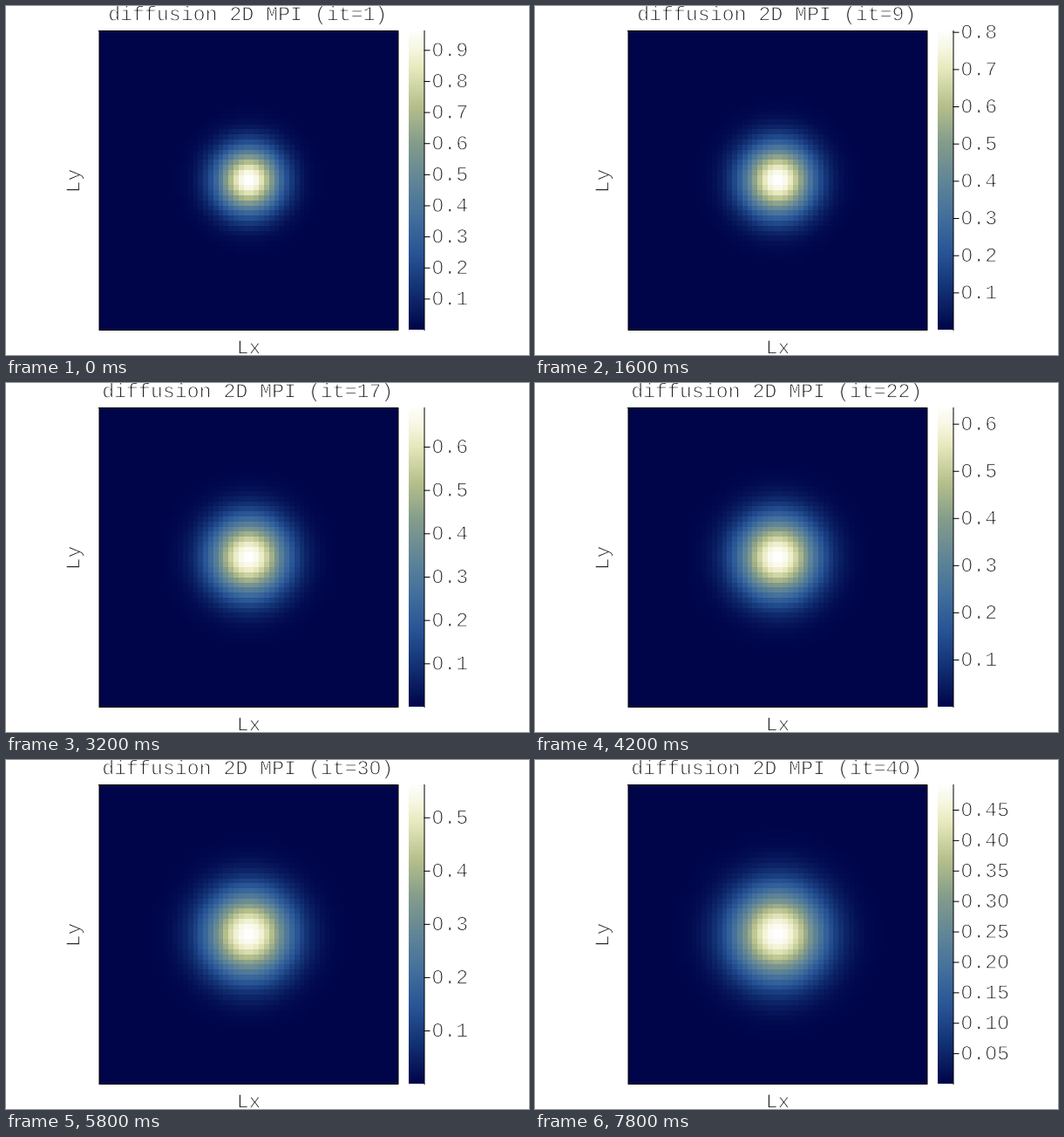
Write a matplotlib script that moves like this. It is 600 by 400 pixels and loops after 8000 ms.

```python
import numpy as np
import matplotlib.pyplot as plt
from matplotlib.animation import FuncAnimation
from matplotlib.colors import LinearSegmentedColormap
from matplotlib.patches import PathPatch, Rectangle
from matplotlib.path import Path
from matplotlib.textpath import TextPath

W, H, DPI = 600, 400, 100
PX = 72 / DPI                       # one pixel in points
LEFT, RIGHT, TOP, BOTTOM = 107, 450, 28.5, 371.5
BAR_L, BAR_R = 462, 480
STEPS, INTERVAL = 40, 200
SIZE = 23.2
ADV = 0.6 * SIZE                    # monospace advance
LINE = dict(color="black", lw=PX, snap=False)

# --- diffusion model ---
N, LENGTH, D = 62, 10.0, 1.0


def simulate():
    dx = LENGTH / N
    dt = dx**2 / D / 4.1
    x = (np.arange(N) + 0.5) * dx - LENGTH / 2
    c = np.exp(-x[:, None]**2 - x[None, :]**2)
    states = []
    for _ in range(STEPS):
        lap = (c[2:, 1:-1] + c[:-2, 1:-1] + c[1:-1, 2:] + c[1:-1, :-2]
               - 4 * c[1:-1, 1:-1])
        c[1:-1, 1:-1] += dt * D / dx**2 * lap
        states.append(c[1:-1, 1:-1].copy())
    return states


states = simulate()

cmap = LinearSegmentedColormap.from_list("deep", [
    (0.000, "#00054a"), (0.125, "#112f71"), (0.250, "#275395"),
    (0.375, "#426f9c"), (0.500, "#618697"), (0.625, "#849c8b"),
    (0.750, "#b6c08c"), (0.875, "#e8e9be"), (0.940, "#f7f7e2"),
    (1.000, "#fefefe")], N=256)

# --- thin monospace lettering ---
glyphs = {}


def glyph(ch):
    if ch not in glyphs:
        p = TextPath((0, 0), ch, size=SIZE, prop={"family": "Liberation Mono"})
        starts = np.flatnonzero(p.codes == Path.MOVETO)[1:]
        parts = list(zip(np.split(p.vertices, starts), np.split(p.codes, starts)))
        if ch == "0":               # plain zero without its inner dot
            parts.sort(key=lambda q: -np.ptp(q[0][:-1], axis=0).prod())
            parts = parts[:2]
        glyphs[ch] = (np.concatenate([q[0] for q in parts]),
                      np.concatenate([q[1] for q in parts]))
    return glyphs[ch]


def lettering(s, x, y, centre=False, upright=False):
    shift = -len(s) * ADV / 2 if centre else 0
    verts, codes = [], []
    for i, ch in enumerate(s):
        if ch == " ":
            continue
        v, c = glyph(ch)
        u = v[:, 0] + shift + i * ADV
        if upright:
            verts.append(np.column_stack([x - v[:, 1], y - u]))
        else:
            verts.append(np.column_stack([x + u, y - v[:, 1]]))
        codes.append(c)
    return Path(np.concatenate(verts), np.concatenate(codes))


# --- stage ---
fig = plt.figure(figsize=(W / DPI, H / DPI), dpi=DPI, facecolor="white")
ax = fig.add_axes([0, 0, 1, 1])
ax.axis("off")

cx, cy = (LEFT + RIGHT) / 2, (TOP + BOTTOM) / 2
n = states[0].shape[0]
half = (RIGHT - LEFT) / (n - 1) / 2   # outer cells are cut in half
heat = ax.imshow(states[0], cmap=cmap, aspect="auto", interpolation="nearest",
                 extent=(LEFT - half, RIGHT + half, BOTTOM + half, TOP - half))
ax.imshow(np.linspace(1, 0, 256)[:, None], cmap=cmap, aspect="auto",
          interpolation="nearest", extent=(BAR_L, BAR_R, BOTTOM, TOP))
ax.set_xlim(0, W)
ax.set_ylim(H, 0)
heat.set_clip_path(Rectangle((LEFT, TOP), RIGHT - LEFT, BOTTOM - TOP,
                             transform=ax.transData))

ax.plot([LEFT, RIGHT, RIGHT, LEFT, LEFT], [TOP, TOP, BOTTOM, BOTTOM, TOP], **LINE)
ax.plot([BAR_R, BAR_R], [TOP, BOTTOM], **LINE)
ticks, = ax.plot([], [], **LINE)


def add_text(path):
    # the white edge slims the strokes
    return ax.add_patch(PathPatch(path, fc="#222222", ec="white", lw=0.9 * PX,
                                  snap=False))


add_text(lettering("Lx", cx, 398.5, centre=True))
add_text(lettering("Ly", 84.5, cy + 0.5, centre=True, upright=True))
title = add_text(lettering("-", 0, 0))
labels = add_text(lettering("-", 0, 0))


def update(k):
    c = states[k]
    lo, hi = c.min(), c.max()
    heat.set_data(c)
    heat.set_clim(lo, hi)
    title.set_path(lettering(f"diffusion 2D MPI (it={k + 1})", cx - 1.2, 16.5,
                             centre=True))

    step, digits = (0.1, 1) if hi >= 0.5 else (0.05, 2)
    values = step * np.arange(1, int(hi / step) + 1)
    ys = BOTTOM - (values - lo) / (hi - lo) * (BOTTOM - TOP)
    labels.set_path(Path.make_compound_path(
        *[lettering(f"{v:.{digits}f}", 488.4, y + 6.8) for v, y in zip(values, ys)]))
    gap = np.full_like(ys, np.nan)
    ticks.set_data(np.tile([BAR_R, BAR_R + 6, np.nan], len(ys)),
                   np.column_stack([ys, ys, gap]).ravel())
    return heat, title, labels, ticks


anim = FuncAnimation(fig, update, frames=STEPS, interval=INTERVAL, repeat=True)
plt.show()
```
